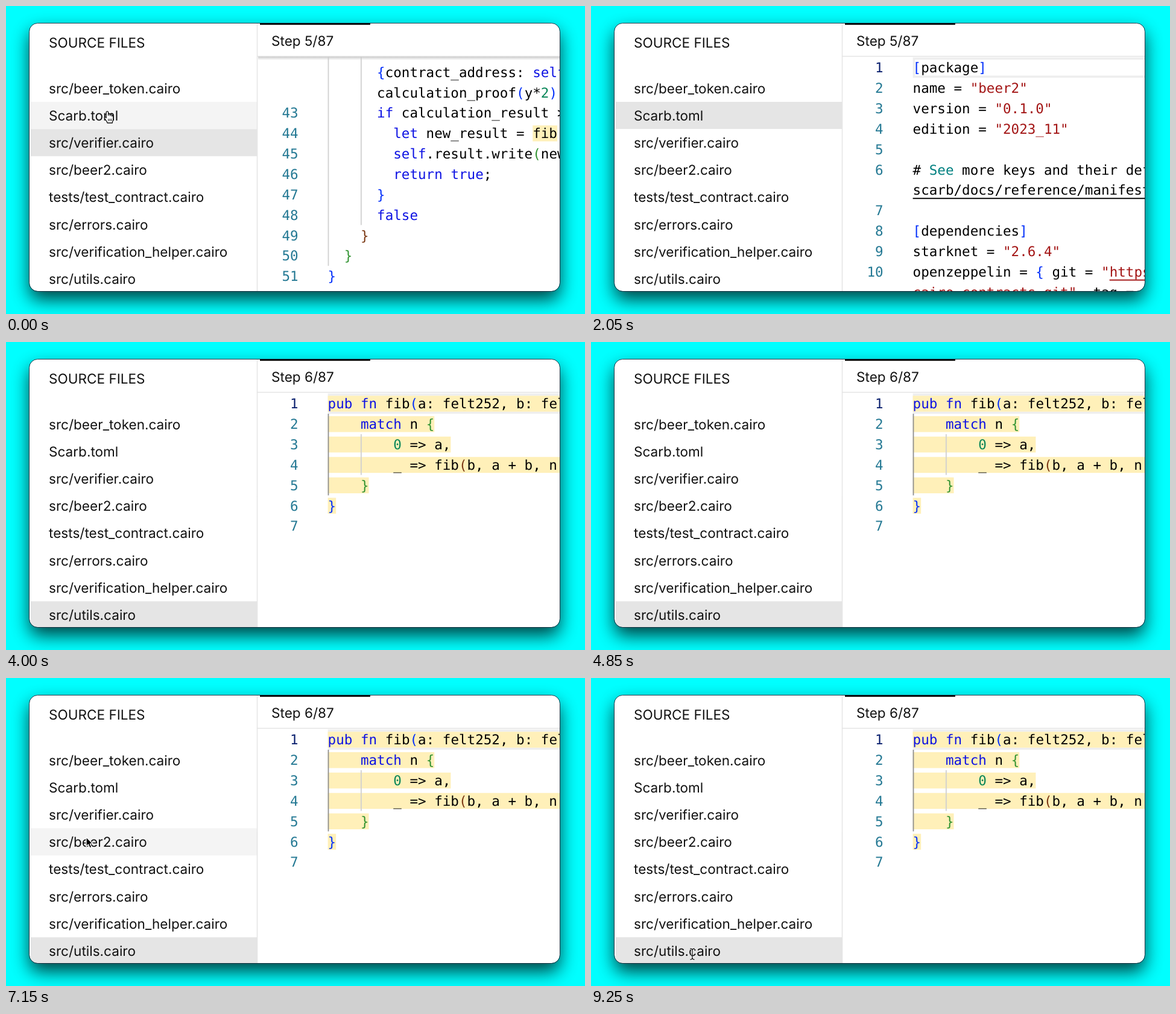
These frames come from a looping animation (960x511 px, 9300 ms). An HTML page:

```html
<!DOCTYPE html>
<html lang="en">
<head>
<meta charset="utf-8">
<title>Source stepping</title>
<style>
  html, body { margin: 0; width: 100%; height: 100%; overflow: hidden; background: #0ff; }
  svg { display: block; width: 100vw; height: 100vh; }
  text { font-size: 22.57px; white-space: pre; text-rendering: geometricPrecision; fill: #111; }
  .ui { font-family: Inter, sans-serif; }
  .code { font-family: "DejaVu Sans Mono", monospace; fill: #000; }
  .num { fill: #237893; text-anchor: end; }
  .now { fill: #0b216f; }
  .k { fill: #0d12e3; }
  .b { fill: #0431fa; }
  .g { fill: #319331; }
  .o { fill: #7b3814; }
  .s { fill: #a31515; }
  .t { fill: #008080; }
  .n { fill: #098658; }
</style>
</head>
<body>
<svg viewBox="0 0 960 511">
  <defs>
    <filter id="blur" x="-20%" y="-20%" width="140%" height="140%"><feGaussianBlur stdDeviation="15"/></filter>
    <linearGradient id="fade" x2="0" y2="1">
      <stop stop-color="#ccc"/><stop offset="1" stop-color="#ccc" stop-opacity="0"/>
    </linearGradient>
    <clipPath id="card"><rect x="39" y="28.5" width="879" height="444.5" rx="14"/></clipPath>
    <clipPath id="pane"><rect x="418" y="84" width="500" height="389"/></clipPath>
  </defs>
  <rect width="960" height="511" fill="#0ff"/>
  <rect x="39" y="42" width="879" height="445" rx="14" opacity=".75" filter="url(#blur)"/>
  <g clip-path="url(#card)">
    <rect x="39" y="28" width="880" height="446" fill="#fff"/>
    <rect id="hover" x="41" width="375" height="45" fill="#f4f4f4"/>
    <rect id="chosen" x="41" width="375" height="45" fill="#e5e5e5"/>
    <g id="files"><text class="ui" x="71" y="69">SOURCE FILES</text></g>
    <path d="M416.5 28V474M417 83.5H919" stroke="#e4e4e4" stroke-width="1.5"/>
    <rect x="421" y="28" width="183" height="3.2"/>
    <text id="step" class="ui" x="440" y="65.6"></text>
    <g id="views" clip-path="url(#pane)"></g>
    <circle id="ring" fill="none" stroke="#8fa3ad" stroke-width="1.2"/>
    <g id="cursor" stroke-linejoin="round">
      <path id="arrow" d="M0 0V15.5L3.5 12.3 6 18 9 16.7 6.5 11.2H11.3Z" stroke="#fff" stroke-width="1.3"/>
      <g id="hand">
        <path d="M-1.8 1.6C-1.8-.6 1.6-.6 1.6 1.6V6.4C2-.0 4.6 4.6 4.7 7 5-.0 7.4 5.4 7.5 7.8 8 6 9.8 6.6 9.8 9V12.5C9.8 15 8.3 16 8.3 19H0C-.2 16-5 12.4-4.8 10.2-4.5 8.4-2.6 9.4-1.8 10.6Z" fill="#fff" stroke="#111" stroke-width="1.3"/>
        <path d="M1.8 12V16M4.2 12V16M6.6 12V16" stroke="#111"/>
      </g>
      <g id="beam" fill="none">
        <path d="M-3.5-9Q0-9 0-6 0-9 3.5-9M0-6V6M-3.5 9Q0 9 0 6 0 9 3.5 9M-2 2.5H2" stroke="#fff" stroke-width="3"/>
        <path d="M-3.5-9Q0-9 0-6 0-9 3.5-9M0-6V6M-3.5 9Q0 9 0 6 0 9 3.5 9M-2 2.5H2" stroke="#111" stroke-width="1.3"/>
      </g>
    </g>
  </g>
  <rect x="38.5" y="28.5" width="880" height="445" rx="14" fill="none" stroke="#123" stroke-opacity=".85"/>
</svg>
<script>
const LOOP = 9300, ROW = 33.85, CHAR = 13.587, LEFT = 533.6, FILE_TOP = 113.8, FILE_ROW = 45.2;
const $ = id => document.getElementById(id);

function add(parent, tag, attrs, content) {
  const node = document.createElementNS("http://www.w3.org/2000/svg", tag);
  for (const key in attrs) node.setAttribute(key, attrs[key]);
  if (content) node.textContent = content;
  return parent.appendChild(node);
}

["src/beer_token.cairo", "Scarb.toml", "src/verifier.cairo", "src/beer2.cairo",
 "tests/test_contract.cairo", "src/errors.cairo", "src/verification_helper.cairo", "src/utils.cairo"]
  .forEach((name, i) => add($("files"), "text", { class: "ui", x: 71, y: 144.6 + i * FILE_ROW }, name));

// Code lines: "number|text", with coloured runs written as ~<class>run~
const fib = [
  "1|~kpub~ ~kfn~ fib~b(~a: felt252, b: felt252",
  "2|    ~kmatch~ n ~g{~",
  "3|        ~n0~ => a,",
  "4|        _ => fib~o(~b, a + b, n - ~n1~",
  "5|    ~g}~",
  "6|~b}~",
  "7|"
];
const fibGuides = [[0, 1, 5, "#8f8f8f"], [4, 2, 4]];

// marks: [row, first column, end column]; guides: [column, first row, end row, colour]
const views = {
  tail: {
    top: 92.6, scrolled: true,
    lines: [
      "|      ~b{~contract_address: ~kself~.",
      "|      calculation_proof~b(~y*~n2~~b)~,",
      "43|      ~kif~ calculation_result >= x",
      "44|        ~klet~ new_result = fib~g(~",
      "45|        ~kself~.result.write~g(~new_result",
      "46|        ~kreturn~ ~ktrue~;",
      "47|      ~b}~",
      "48|      ~kfalse~",
      "49|    ~o}~",
      "50|  ~g}~",
      "51|~b}~"
    ],
    marks: [[3, 25, 28]],
    guides: [[0, -1, 10], [4, -1, 8]]
  },
  scarb: {
    top: 85.2,
    lines: [
      "1|~b[~package~b]~",
      "2|name = ~s\"beer2\"~",
      "3|version = ~s\"0.1.0\"~",
      "4|edition = ~s\"2023_11\"~",
      "5|",
      "6|# ~tSee~ more keys and their definitions",
      "|scarb/docs/reference/manifest.html",
      "7|",
      "8|~b[~dependencies~b]~",
      "9|starknet = ~s\"2.6.4\"~",
      "10|openzeppelin = ~b{~ git = ~s\"https://~",
      "|~scairo-contracts.git\"~, tag = ~s\"v0~"
    ],
    lined: [[6, 0, 34, "#000"], [10, 24, 32, "#a31515"]]
  },
  verifier: {
    top: 85.2,
    lines: [
      "1|~kuse~ starknet::~tContractAddress~;",
      "2|",
      "3|#~b[~starknet::interface~b]~",
      "4|~ktrait~ ~tIVerificationHelper~<~tTContractState~>",
      "5|  ~kfn~ calculation_proof~g(~~kref~ ~kself~: ",
      "|  ~tu256~;",
      "6|~b}~",
      "7|",
      "8|#~b[~starknet::interface~b]~",
      "9|~ktrait~ ~tIVerifier~<~tTContractState~>",
      "10|  ~kfn~ verify~g(~~kref~ ~kself~: ~tTContractState~",
      "11|~b}~"
    ],
    guides: [[0, 4, 6], [0, 10, 11]]
  },
  fibAll: {
    top: 85.2, lines: fib, guides: fibGuides,
    marks: [[0, 0, 34], [1, 0, 13], [2, 0, 15], [3, 0, 34], [4, 0, 5], [5, 0, 1]]
  },
  fibBody: {
    top: 85.2, lines: fib, guides: fibGuides,
    marks: [[1, 4, 13], [2, 0, 15], [3, 0, 34], [4, 0, 5]]
  }
};

function build({ top, lines, scrolled, marks = [], guides = [], lined = [] }) {
  const g = add($("views"), "g", {});
  if (!scrolled) add(g, "rect", { x: 535.5, y: 87.2, width: 400, height: 30, fill: "none", stroke: "#eee", "stroke-width": 3.6 });
  for (const [r, a, b] of marks)
    add(g, "rect", { x: LEFT + a * CHAR, y: top + r * ROW + 4, width: (b - a) * CHAR, height: 26.4, fill: "#fff0b9" });
  for (const [c, a, b, colour = "#d0d0d0"] of guides)
    add(g, "rect", { x: LEFT + c * CHAR, y: top + a * ROW, width: 1.8, height: (b - a) * ROW, fill: colour });
  lines.forEach((line, r) => {
    const cut = line.indexOf("|"), y = top + r * ROW + 25.1;
    const now = r === 0 && !scrolled ? " now" : "";
    add(g, "text", { class: "code num" + now, x: 484.6, y }, line.slice(0, cut));
    const text = add(g, "text", { class: "code", x: LEFT, y });
    line.slice(cut + 1).split("~").forEach((run, i) => {
      if (run) add(text, "tspan", i % 2 ? { class: run[0] } : {}, i % 2 ? run.slice(1) : run);
    });
  });
  for (const [r, a, b, fill] of lined)
    add(g, "rect", { x: LEFT + a * CHAR, y: top + r * ROW + 30, width: (b - a) * CHAR, height: 1.9, fill });
  if (scrolled) add(g, "rect", { x: 418, y: 84, width: 500, height: 6, fill: "url(#fade)" });
  return g;
}
const groups = {};
for (const key in views) groups[key] = build(views[key]);

// start time, view, chosen file, step
const scenes = [
  [0, "tail", 2, 5], [450, "scarb", 1, 5], [3000, "fibAll", 7, 6], [5000, "fibBody", 7, 7],
  [6600, "fibAll", 7, 6], [7800, "verifier", 2, 6], [8800, "fibAll", 7, 6]
];
// time, x, y
const path = [
  [0, 168, 175], [1200, 168, 175], [6800, 225, 440], [7150, 133, 264], [7500, 169, 222],
  [7900, 169, 222], [8150, 170, 323], [8450, 168, 458], [LOOP, 168, 458]
];
// time, x, y
const clicks = [[350, 168, 177], [7720, 169, 222], [8680, 168, 456]];

const clamp = v => Math.max(0, Math.min(1, v));
const show = (node, on) => node.setAttribute("visibility", on ? "inherit" : "hidden");

function cursorAt(t) {
  const i = path.findIndex((p, n) => n && t <= p[0]);
  const [t0, x0, y0] = path[i - 1], [t1, x1, y1] = path[i];
  const u = (t - t0) / (t1 - t0), e = u * u * (3 - 2 * u);
  return [x0 + (x1 - x0) * e, y0 + (y1 - y0) * e];
}

function draw(t) {
  const [, view, file, step] = scenes.filter(s => s[0] <= t).pop();
  for (const key in groups) show(groups[key], key === view);
  $("step").textContent = `Step ${step}/87`;
  $("chosen").setAttribute("y", FILE_TOP + file * FILE_ROW);

  const [x, y] = cursorAt(t);
  const alpha = t < 4000 ? clamp((1150 - t) / 250) : clamp((t - 6800) / 150);
  $("cursor").setAttribute("transform", `translate(${x} ${y})`);
  $("cursor").setAttribute("opacity", alpha);
  const shape = t > 9100 ? "beam" : t > 6000 && t < 7300 ? "arrow" : "hand";
  for (const id of ["arrow", "hand", "beam"]) show($(id), id === shape);
  $("hover").setAttribute("y", FILE_TOP + Math.floor((y - FILE_TOP) / FILE_ROW) * FILE_ROW);
  show($("hover"), alpha > 0);

  const click = clicks.find(c => t >= c[0] && t < c[0] + 500);
  show($("ring"), click);
  if (click) {
    const u = (t - click[0]) / 500;
    $("ring").setAttribute("cx", click[1]);
    $("ring").setAttribute("cy", click[2]);
    $("ring").setAttribute("r", 6 + 30.5 * (1 - (1 - u) ** 3));
    $("ring").setAttribute("opacity", 0.9 - 0.6 * u);
  }
}

const start = performance.now();
function tick() {
  draw((performance.now() - start) % LOOP);
  requestAnimationFrame(tick);
}
draw(0);
requestAnimationFrame(tick);
</script>
</body>
</html>
```
